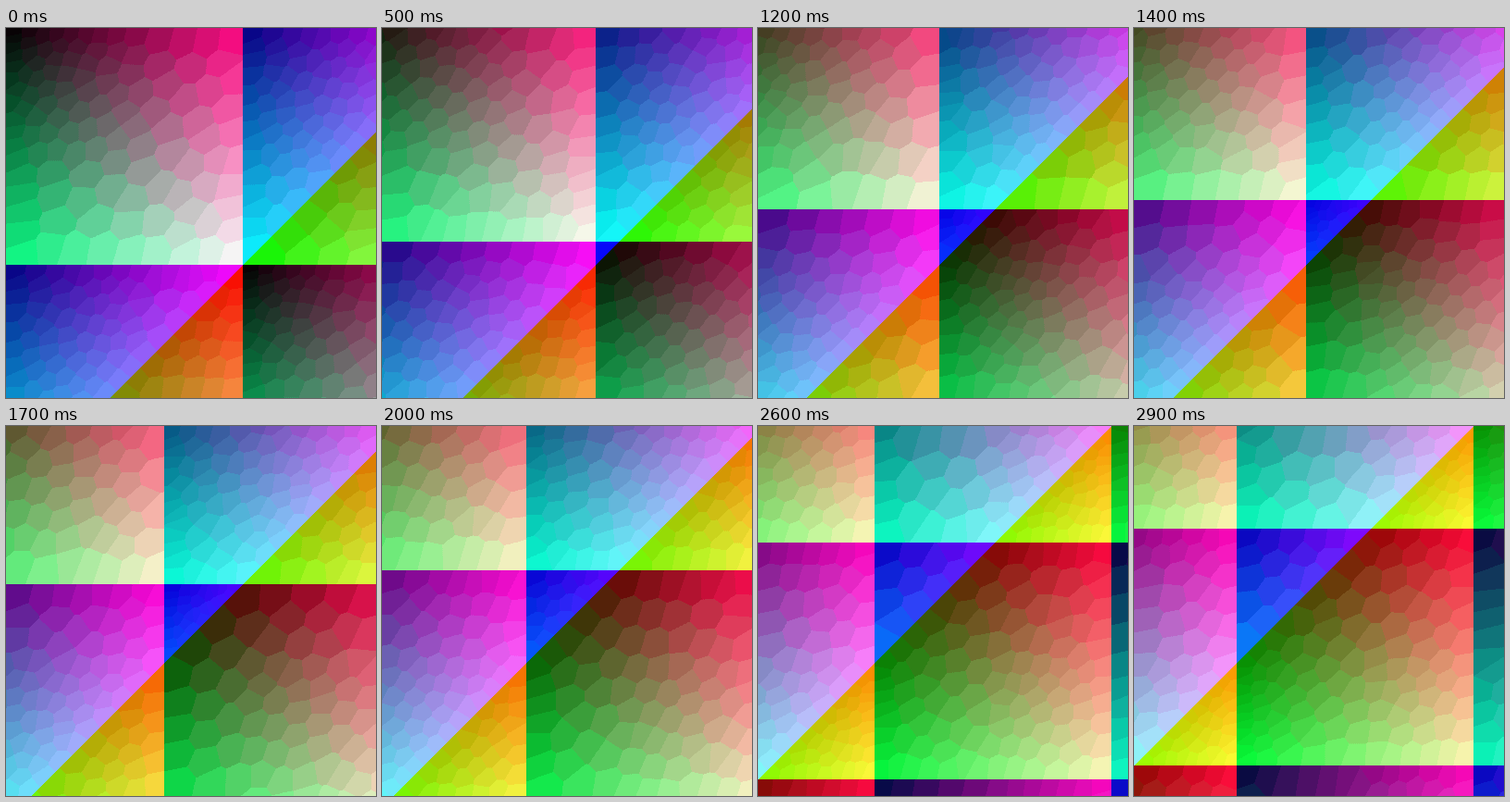
Recreate the animation shown at these times as an HTML page with a canvas. Size 400 by 400 pixels, loop 3 s.

```html
<!DOCTYPE html>
<html lang="en">
<head>
<meta charset="utf-8">
<title>Drifting colour mosaic</title>
<style>
  html, body { margin: 0; height: 100%; overflow: hidden; background: #000; }
  canvas { display: block; }
</style>
</head>
<body>
<canvas id="stage" width="400" height="400"></canvas>
<script>
const SIZE = 400, PIXELS = SIZE * SIZE, STEPS = 30, STEP_MS = 100, DRIFT = 5, COLORS = 256;
const ctx = document.getElementById('stage').getContext('2d');
const cache = [];

// Three byte-wide ramps that wrap around and drift towards the top left.
const red = (x, shift) => (x + shift) & 255;
const green = (y, shift) => (y + shift) & 255;
const blue = (x, y, shift) => ((x + y + shift) >> 1) & 255;

// Trains a chain of 256 colours on the ramps (self-organising map).
function trainPalette(shift) {
  const STRIDE = 499, CYCLE = PIXELS / 128, BETA = 1 / 1024;
  const R = Float64Array.from({ length: COLORS }, (_, i) => i);
  const G = R.slice(), B = R.slice();
  const A = R.map(i => i < 16 ? i * 16 : 255);
  const freq = new Float64Array(COLORS).fill(1 / COLORS);
  const bias = new Float64Array(COLORS);
  let alpha = 1024, radius = 2048, reach = 32;

  function pull(i, k, r, g, b) {
    R[i] -= k * (R[i] - r);
    G[i] -= k * (G[i] - g);
    B[i] -= k * (B[i] - b);
    A[i] -= k * (A[i] - 255);
  }

  // Nearest colour, with a bonus for those that seldom win.
  function findWinner(r, g, b) {
    let best = 0, bestDist = 1e9, winner = 0, winnerDist = 1e9;
    for (let i = 0; i < COLORS; i++) {
      let dist = Math.abs(B[i] - b) + Math.abs(R[i] - r);
      if (dist < bestDist || dist < winnerDist + bias[i]) {
        dist += Math.abs(G[i] - g);
        dist += Math.abs(A[i] - 255);
        if (dist < bestDist) { bestDist = dist; best = i; }
        const biased = dist - bias[i];
        if (biased < winnerDist) { winnerDist = biased; winner = i; }
      }
      freq[i] -= BETA * freq[i];
      bias[i] += freq[i];
    }
    freq[best] += BETA;
    bias[best] -= 1;
    return winner;
  }

  for (let n = 1, p = 0; n <= PIXELS; n++, p = (p + STRIDE) % PIXELS) {
    const x = p % SIZE, y = Math.floor(p / SIZE);
    const r = red(x, shift), g = green(y, shift), b = blue(x, y, shift);
    const w = findWinner(r, g, b), rate = alpha / 1024;
    pull(w, rate, r, g, b);
    for (let m = 1; m < reach; m++) {
      const k = rate * (reach * reach - (m - 1) * (m - 1)) / (reach * reach);
      if (w + m < COLORS) pull(w + m, k, r, g, b);
      if (w - m > 0) pull(w - m, k, r, g, b);
    }
    if (n % CYCLE === 0) {
      alpha -= Math.floor(alpha / 30);
      radius -= Math.floor(radius / 30);
      reach = radius >> 6;
      if (reach <= 1) reach = 0;
    }
  }
  return Array.from(R, (r, i) => [r, G[i], B[i]].map(Math.round));
}

// Paints every pixel with the nearest palette colour.
function buildPicture(step) {
  const shift = step * DRIFT;
  const palette = trainPalette(shift);
  const image = new ImageData(SIZE, SIZE);
  const data = image.data;
  for (let y = 0, o = 0; y < SIZE; y++) {
    const g = green(y, shift);
    const row = palette
      .map(c => ({ r: c[0], g: c[1], b: c[2], dg: (c[1] - g) ** 2 }))
      .sort((a, c) => a.dg - c.dg);
    let near = row[0];
    for (let x = 0; x < SIZE; x++, o += 4) {
      const r = red(x, shift), b = blue(x, y, shift);
      const distance = c => c.dg + (c.r - r) * (c.r - r) + (c.b - b) * (c.b - b);
      let best = distance(near);
      for (let i = 0; i < COLORS && row[i].dg < best; i++) {
        const dist = distance(row[i]);
        if (dist < best) { best = dist; near = row[i]; }
      }
      data[o] = near.r;
      data[o + 1] = near.g;
      data[o + 2] = near.b;
      data[o + 3] = 255;
    }
  }
  return image;
}

const picture = step => cache[step] || (cache[step] = buildPicture(step));

let shown = -1;
function draw() {
  const step = Math.floor(performance.now() / STEP_MS) % STEPS;
  if (step !== shown) {
    ctx.putImageData(picture(step), 0, 0);
    shown = step;
  } else {
    picture((step + 1) % STEPS); // prepare the next one while this one rests
  }
  requestAnimationFrame(draw);
}
draw();
</script>
</body>
</html>
```
